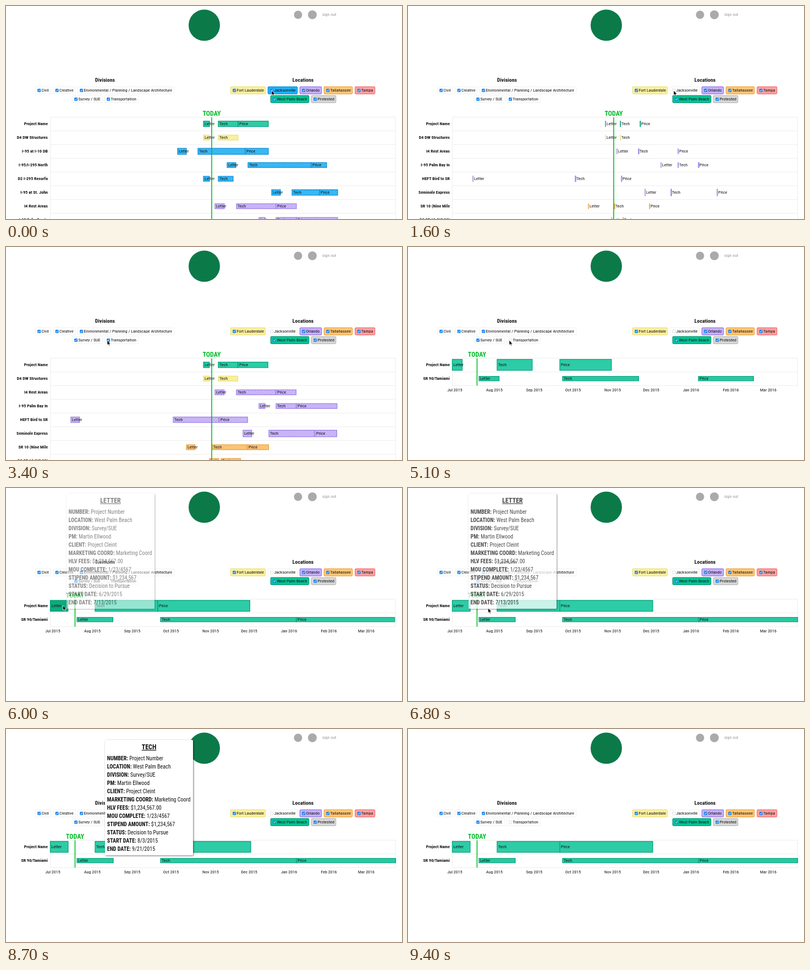
Recreate the animation shown at these times as an HTML page. Size 720x388 px, loop 9500 ms.

```html
<!DOCTYPE html>
<html lang="en">
<head>
<meta charset="utf-8">
<title>Project timeline</title>
<style>
  html, body { margin: 0; width: 100%; height: 100%; overflow: hidden; background: #fff; }
  svg { display: block; width: 100vw; height: 100vh; }
  text {
    font: 8px "Roboto Condensed", Roboto, sans-serif;
    font-stretch: 75%;
    fill: #111;
    white-space: pre;
  }
  .bold { font-weight: 700; }
  .head { font-size: 9.8px; }
  .today { font-size: 12px; fill: #00bd26; }
  .tip { font-size: 10px; }
  .title { font-size: 12px; text-decoration: underline; }
  .soft { fill: #999; }
  .mid { text-anchor: middle; }
  .end { text-anchor: end; }
</style>
</head>
<body>
<svg id="stage" viewBox="0 0 720 388"></svg>
<script>
const LOOP = 9500, STEP = 100, GROW = 2600;
const UNCHECK_CITY = 1200, UNCHECK_DIVISION = 3750;
const stage = document.getElementById('stage');

// fill, line
const COLORS = {
  green: ['#35d4ae', '#00a077'],
  blue: ['#3fbdf8', '#0a8fd6'],
  purple: ['#cfbcfa', '#9b7fe6'],
  yellow: ['#fbf2a6', '#ecdf78'],
  orange: ['#ffc97c', '#ee9f38'],
  dark: ['#0fb083', '#008a64']
};

function el(tag, attrs = {}, parent = stage, content) {
  const node = document.createElementNS('http://www.w3.org/2000/svg', tag);
  for (const key in attrs) node.setAttribute(key, attrs[key]);
  if (content !== undefined) node.textContent = content;
  return parent.appendChild(node);
}
const box = (x, y, width, height, attrs, parent) => el('rect', { x, y, width, height, ...attrs }, parent);
const label = (x, y, str, cls = '', parent) => el('text', { x, y, class: cls }, parent, str);
const show = (node, on) => node.setAttribute('visibility', on ? 'visible' : 'hidden');

// Hatches
const defs = el('defs');
const HATCH = {
  diag: { size: 4, d: 'M2 0V4', turn: 45, width: 0.9 },
  fine: { size: 2, d: 'M1 0V2', turn: 45, width: 0.5 },
  lines: { size: 2.6, d: 'M0 1.3H2.6', turn: 0, width: 0.9 }
};
for (const color in COLORS) {
  for (const kind in HATCH) {
    const { size, d, turn, width } = HATCH[kind];
    const p = el('pattern', {
      id: color + '-' + kind, width: size, height: size,
      patternUnits: 'userSpaceOnUse', patternTransform: `rotate(${turn})`
    }, defs);
    box(0, 0, size, size, { fill: COLORS[color][0] }, p);
    el('path', { d, stroke: COLORS[color][1], 'stroke-width': width, 'stroke-opacity': 0.6 }, p);
  }
}
const shade = el('filter', { id: 'shade', x: '-10%', y: '-10%', width: '120%', height: '120%' }, defs);
el('feDropShadow', { dx: 1, dy: 1, stdDeviation: 1.5, 'flood-color': '#000', 'flood-opacity': 0.55 }, shade);

// Header
el('circle', { cx: 360.5, cy: 35, r: 28.5, fill: '#0b7a48' });
el('circle', { cx: 531, cy: 16, r: 7.5, fill: '#aaa' });
el('circle', { cx: 557, cy: 16, r: 8, fill: '#aaa' });
label(575, 18, 'sign out', 'soft');
label(180, 138, 'Divisions', 'bold head mid');
label(540, 138, 'Locations', 'bold head mid');

// Filter chips; the returned function sets the checked state
function chip(x, y, width, str, fill, line) {
  const back = box(x + 0.3, y + 0.1, width - 0.6, 13, { rx: 1.5, 'stroke-width': 1.2 });
  const off = box(x + 4.5, y + 4, 5.5, 5.5, { rx: 1, fill: '#fff', stroke: '#ccc', 'stroke-width': 0.6 });
  const on = el('g');
  box(x + 4.2, y + 3.7, 6, 6, { rx: 1.2, fill: '#1b83ee' }, on);
  el('path', {
    d: `M${x + 5.5} ${y + 6.8}l1.3 1.4 2.3 -3.2`,
    fill: 'none', stroke: '#fff', 'stroke-width': 0.9
  }, on);
  label(x + 11.4, y + 9, str);
  const set = checked => {
    back.setAttribute('fill', checked && fill || '#fff');
    back.setAttribute('stroke', checked && line || '#f3f3f3');
    show(on, checked);
    show(off, !checked);
  };
  set(true);
  return set;
}
chip(53, 147, 29, 'Civil');
chip(85.5, 147, 41, 'Creative');
chip(130, 147, 176, 'Environmental / Planning / Landscape Architecture');
chip(120, 163, 56, 'Survey / SUE');
const setDivision = chip(179, 163, 62, 'Transportation');
chip(408, 147, 64, 'Fort Lauderdale', '#fbf0a0', '#eee07a');
const setCity = chip(476, 147, 54, 'Jacksonville', '#1cb1fa', '#0a8fd6');
chip(534, 147, 40, 'Orlando', '#c6b0fa', '#9678e6');
chip(578, 147, 52, 'Tallahassee', '#ffc878', '#f0a23a');
chip(634.5, 147, 36.5, 'Tampa', '#ffa2a2', '#f46c6c');
chip(481, 163, 70, 'West Palm Beach', '#00c696', '#00936c');
chip(555, 163, 45, 'Protested', '#d8d8d8', '#b8b8b8');

// Chart rows: name, color, hatch, bar height, then start and end of each phase
const PHASES = ['Letter', 'Tech', 'Price'];
const first = ['Project Name', 'green', 'fine', 10, 359, 370, 386, 422, 422, 477];
const second = ['D4 DW Structures', 'yellow', 'diag', 9, 359, 370, 386, 422];
const rest = ['I4 Rest Areas', 'purple', 'diag', 9, 380, 397, 419, 491, 491, 528];
const bay = ['I-95 Palm Bay In', 'purple', 'diag', 9, 460, 471, 491, 528, 528, 603];
const all = [
  first, second,
  ['I-95 at I-10 DB', 'blue', 'diag', 11, 312, 328, 349, 435, 435, 477],
  ['I-95/I-295 North', 'blue', 'diag', 9, 402, 418, 440, 555, 555, 583],
  ['D2 I-295 Resurfa', 'blue', 'diag', 9, 359, 370, 386, 413],
  ['I-95 at St. John', 'blue', 'diag', 10, 483, 499, 520, 570, 570, 603],
  rest, bay
];
const noCity = [
  first, second, rest, bay,
  ['HEFT Bird to SR', 'purple', 'diag', 10, 118, 134, 304, 388, 388, 440],
  ['Seminole Express', 'purple', 'diag', 12, 431, 447, 478, 562, 562, 602],
  ['SR 10 (Nine Mile', 'orange', 'diag', 9, 328, 344, 375, 439, 439, 478],
  ['D2 SR 10 (US 90)', 'orange', 'diag', 9, 370, 387, 391, 427]
];
const survey = [
  ['Project Name', 'green', 'fine', 20, 80.5, 113, 162, 277, 276, 445],
  ['SR 90/Tamiami', 'green', 'lines', 8, 129, 195, 281, 530, 528, 708.5]
];

function chart(rows, today, start) {
  const g = el('g'), bars = [], bottom = 202.5 + rows.length * 25;
  for (let y = 202.5; y <= bottom; y += 25) el('path', { d: `M80 ${y}H708.5`, stroke: '#eee' }, g);
  el('path', { d: `M80.5 202V${bottom}M708.5 202V${bottom}`, stroke: '#eee' }, g);
  rows.forEach(([name, color, hatch, h, ...spans], i) => {
    const y = 214.7 + i * 25;
    label(76, y + 2.6, name, 'bold end', g);
    for (let k = 0; k < spans.length; k += 2) {
      const node = box(spans[k], y - h / 2, 0, h, {
        fill: `url(#${color}-${hatch})`, stroke: COLORS[color][1], 'stroke-width': 1.2
      }, g);
      bars.push({ node, width: spans[k + 1] - spans[k] });
      label(spans[k] + 2, y + 2.6, PHASES[k / 2], '', g);
    }
  });
  el('path', { d: `M${today} 203V${bottom}`, stroke: '#00bd26', 'stroke-width': 1.6 }, g);
  label(today, 200.3, 'TODAY', 'bold today mid', g);
  return { g, bars, start };
}
const charts = [
  chart(all, 374, -GROW),
  chart(noCity, 374, UNCHECK_CITY),
  chart(survey, 125.5, UNCHECK_DIVISION)
];
const MONTHS = ['Jul 2015', 'Aug 2015', 'Sep 2015', 'Oct 2015', 'Nov 2015', 'Dec 2015', 'Jan 2016', 'Feb 2016', 'Mar 2016'];
const AXIS = [85, 157, 229.5, 300, 372, 442, 514.5, 587, 655];
MONTHS.forEach((m, i) => label(AXIS[i], 262.7, m, 'mid', charts[2].g));

// Tooltips
function tooltip(x, y, title, from, to) {
  const g = el('g', { transform: `translate(${x} ${y})` });
  box(0, 0, 160, 210, { rx: 1.5, fill: '#fff', filter: 'url(#shade)' }, g);
  label(80, 17, title, 'bold title mid', g);
  const fields = [
    ['NUMBER', 'Project Number'], ['LOCATION', 'West Palm Beach'], ['DIVISION', 'Survey/SUE'],
    ['PM', 'Martin Ellwood'], ['CLIENT', 'Project Cleint'], ['MARKETING COORD', 'Marketing Coord'],
    ['HLV FEES', '$1,234,567.00'], ['MOU COMPLETE', '1/23/4567'], ['STIPEND AMOUNT', '$1,234,567'],
    ['STATUS', 'Decision to Pursue'], ['START DATE', from], ['END DATE', to]
  ];
  fields.forEach(([key, value], i) => {
    const line = label(3.8, 36.6 + i * 15, '', 'tip', g);
    el('tspan', { class: 'bold' }, line, key + ': ');
    el('tspan', {}, line, value);
  });
  return g;
}
const tips = [
  { node: tooltip(110, 10, 'LETTER', '6/29/2015', '7/13/2015'), bar: 0, on: 5900, off: 6750 },
  { node: tooltip(180, 20, 'TECH', '8/3/2015', '9/21/2015'), bar: 1, on: 6950, off: 8700 }
];

const cursor = el('path', {
  d: 'M0 0V8.6L2 6.8 3.4 9.8 4.8 9.2 3.5 6.3H6.2Z',
  fill: '#000', stroke: '#fff', 'stroke-width': 0.7
});
// time, x, y
const TRAIL = [
  [0, 483, 154], [2200, 483, 154], [3100, 184, 170], [5300, 184, 170], [5800, 103.5, 214],
  [6600, 103.5, 214], [6950, 173, 222], [7400, 203.5, 216], [LOOP, 203.5, 216]
];

const clamp = v => Math.min(1, Math.max(0, v));
const ease = p => p < 0.5 ? 4 * p ** 3 : 1 - 4 * (1 - p) ** 3;
const smooth = p => p * p * (3 - 2 * p);

function trailAt(t) {
  const i = TRAIL.findIndex(k => k[0] > t);
  const [t0, x0, y0] = TRAIL[i - 1], [t1, x1, y1] = TRAIL[i];
  const p = smooth((t - t0) / (t1 - t0));
  return [x0 + (x1 - x0) * p, y0 + (y1 - y0) * p];
}

function draw(t) {
  setCity(t < UNCHECK_CITY);
  setDivision(t < UNCHECK_DIVISION);
  const active = t < UNCHECK_CITY ? 0 : t < UNCHECK_DIVISION ? 1 : 2;
  charts.forEach(({ g, bars, start }, i) => {
    g.setAttribute('display', i === active ? 'inline' : 'none');
    if (i !== active) return;
    const p = ease(clamp((t - start) / GROW));
    for (const { node, width } of bars) node.setAttribute('width', width * p);
  });
  for (const { node, bar, on, off } of tips) {
    const fade = t < off ? clamp((t - on) / 200) : 1 - clamp((t - off) / 200);
    node.setAttribute('opacity', fade);
    const color = t >= on && t < off ? 'dark' : 'green';
    charts[2].bars[bar].node.setAttribute('fill', `url(#${color}-fine)`);
  }
  cursor.setAttribute('transform', `translate(${trailAt(t)})`);
  show(cursor, t < 8700);
}

function frame() {
  const t = performance.now() % LOOP;
  draw(Math.floor(t / STEP) * STEP);
  requestAnimationFrame(frame);
}
frame();
</script>
</body>
</html>
```
